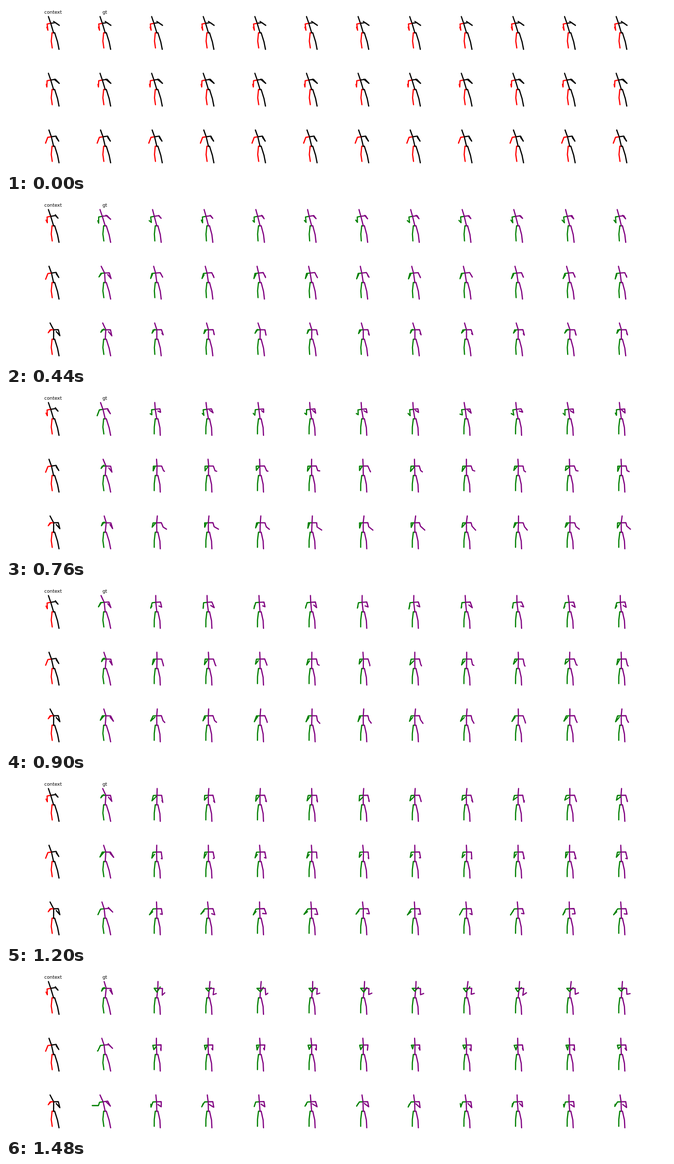
An HTML page with a canvas that plays this animation: 1280x320 px, repeating every 1.5 s.

```html
<!DOCTYPE html>
<html lang="en">
<head>
<meta charset="utf-8">
<title>Motion samples</title>
<style>
  html, body { margin: 0; width: 1280px; height: 320px; overflow: hidden; background: #fff; }
  canvas { position: absolute; left: 0; top: 0; }
  span {
    position: absolute; top: 6px; transform: translateX(-50%);
    font: 9px/12px "DejaVu Sans", sans-serif; color: #000;
  }
</style>
</head>
<body>
<canvas id="stage" width="1280" height="320"></canvas>
<span style="left:91px">context</span>
<span style="left:191px">gt</span>
<script>
const LOOP = 1500, STEP = 20, CONTEXT_END = 280, SETTLE = 300;
const COLS = 12, PITCH_X = 99.8, PITCH_Y = 110, ROOT_X = 92, ROOT_Y = 52;
const HEAD_Y = -31.5, NECK_Y = -18.3;
const PAST = ['#f00', '#000'], FUTURE = ['#008000', '#800080'];

// Key poses, in pixels from the pelvis:
// time, head x, neck x, left elbow, left wrist, right elbow, right wrist
const recorded = [
  [0, -10, -5.5, -11, -5, -13, -11, 11, -14.5, 0, -22],
  [260, -10, -5.5, -12, -6, -14.5, -11, 8.5, -15, 3.5, -21.5],
  [500, -10, -5.5, -13, -5, -14, -10, 11, -12, 1, -20],
  [760, -9, -4.3, -15.5, -6, -12.5, -14, 10, -10, 5, -17],
  [1020, -7, 0, -10.5, -12.5, -5, -18.5, 12, -7, 5, -15],
  [1480, -2, 2, -7, -13, -2, -20, 14, -7, 9, -15],
  [1800, -4, .5, -12, -7, -5, -15, 17, -9, 9, -17],
  [1960, -6.3, -2, -14, -7, -14, -7, 14.5, -12, 6, -21],
  [2240, -10, -4, -13, -11, -25, -11, 10, -10, 2, -18]
];

// Each row is a window into the recording, with its own mean prediction
const rows = [
  { offset: 0, mean: [
    [760, -4.3, -2.7, -9, -7, -12.5, -10, 8, -12, 2, -16],
    [1040, -1, -1, -12, -6.5, -6, -13, 12.5, -6, 8, -9],
    [1480, 2.5, 1.5, 0, -12, 6, -20.5, 10, -6, 16, -9]
  ] },
  { offset: 500, mean: [
    [760, -.5, 0, -7.5, -9, -2, -17, 12, -10, 15, -8],
    [1040, -.5, 0, -10, -7, -5, -14, 12, -6, 11, -5],
    [1480, -1, -.3, -5, -10, -2, -16.5, 9, -8, 7.5, -12]
  ] },
  { offset: 760, mean: [
    [760, 1, .2, -8, -9, -3, -18, 11.5, -11, 18.5, -5],
    [1040, -.5, 0, -14, -7, -7, -14, 12, -8, 9, -6],
    [1480, -2, -1, -12, -9, -11, -14, 9.5, -8, 2, -14]
  ] }
];

// Smooth curve through the key poses
function poseAt(keys, time) {
  const last = keys.length - 1;
  const t = Math.min(Math.max(time, keys[0][0]), keys[last][0]);
  let i = 0;
  while (i < last - 1 && keys[i + 1][0] < t) i++;
  const h = keys[i + 1][0] - keys[i][0], u = (t - keys[i][0]) / h, v = 1 - u;
  const slope = (j, k) => {
    const a = keys[Math.max(j - 1, 0)], b = keys[Math.min(j + 1, last)];
    return (b[k] - a[k]) / (b[0] - a[0]);
  };
  return keys[i].slice(1).map((from, n) => {
    const k = n + 1;
    return v * v * ((1 + 2 * u) * from + u * h * slope(i, k)) +
           u * u * ((3 - 2 * u) * keys[i + 1][k] - v * h * slope(i + 1, k));
  });
}

// Predictions leave from the last observed pose
for (const row of rows) {
  const start = poseAt(recorded, row.offset + CONTEXT_END);
  row.keys = [[CONTEXT_END, ...start], ...row.mean];
}

function random(n) {
  const s = Math.sin(n * 12.9898) * 43758.5453;
  return s - Math.floor(s);
}

const settled = t => Math.min(1, (t - CONTEXT_END) / SETTLE);

// Predictions drift apart, the arms more than the body
function predict(row, seed, t) {
  return poseAt(row.keys, t).map((value, k) => {
    const spread = (k < 2 ? .5 : 1) * settled(t);
    const phase = 2 * Math.PI * random(seed * 11 + k);
    return value + spread * Math.sin(phase + t / 260);
  });
}

const ctx = document.getElementById('stage').getContext('2d');
ctx.lineWidth = 2.3;
ctx.lineCap = ctx.lineJoin = 'round';

function line(color, ...points) {
  ctx.strokeStyle = color;
  ctx.beginPath();
  points.forEach(([x, y]) => ctx.lineTo(x, y));
  ctx.stroke();
}

function figure(x, y, pose, [left, right], stance) {
  const [headX, neckX, ...arms] = pose;
  const root = [0, 0], neck = [neckX, NECK_Y];
  const tilt = .028 * (neckX - 1);
  const arm = (reach, i) => [
    neck, [neckX + reach, NECK_Y + reach * tilt],
    [arms[i], arms[i + 1]], [arms[i + 2], arms[i + 3]]
  ];
  ctx.save();
  ctx.translate(x, y);
  line(left, root, [-3, 0], [-4.5 - .4 * stance, 16], [-2.6 - 2.4 * stance, 29.3]);
  line(right, root, [2.2, 0], [7.6 - 1.6 * stance, 17.3], [10.5 - 3.8 * stance, 32]);
  line(right, root, neck, [headX, HEAD_Y]);
  line(left, ...arm(-7, 0));
  line(right, ...arm(9, 4));
  ctx.restore();
}

function draw(t) {
  ctx.clearRect(0, 0, 1280, 320);
  rows.forEach((row, r) => {
    const seen = poseAt(recorded, row.offset + Math.min(t, CONTEXT_END));
    const truth = poseAt(recorded, row.offset + t);
    for (let col = 0; col < COLS; col++) {
      const past = t <= CONTEXT_END || col === 0;
      const guess = !past && col > 1;
      const pose = guess ? predict(row, r * COLS + col, t) : past ? seen : truth;
      figure(ROOT_X + col * PITCH_X, ROOT_Y + r * PITCH_Y, pose,
             past ? PAST : FUTURE, guess ? settled(t) : 0);
    }
  });
}

const began = performance.now();
function tick() {
  const t = (performance.now() - began) % LOOP;
  draw(Math.floor(t / STEP) * STEP);
  requestAnimationFrame(tick);
}
tick();
</script>
</body>
</html>
```
